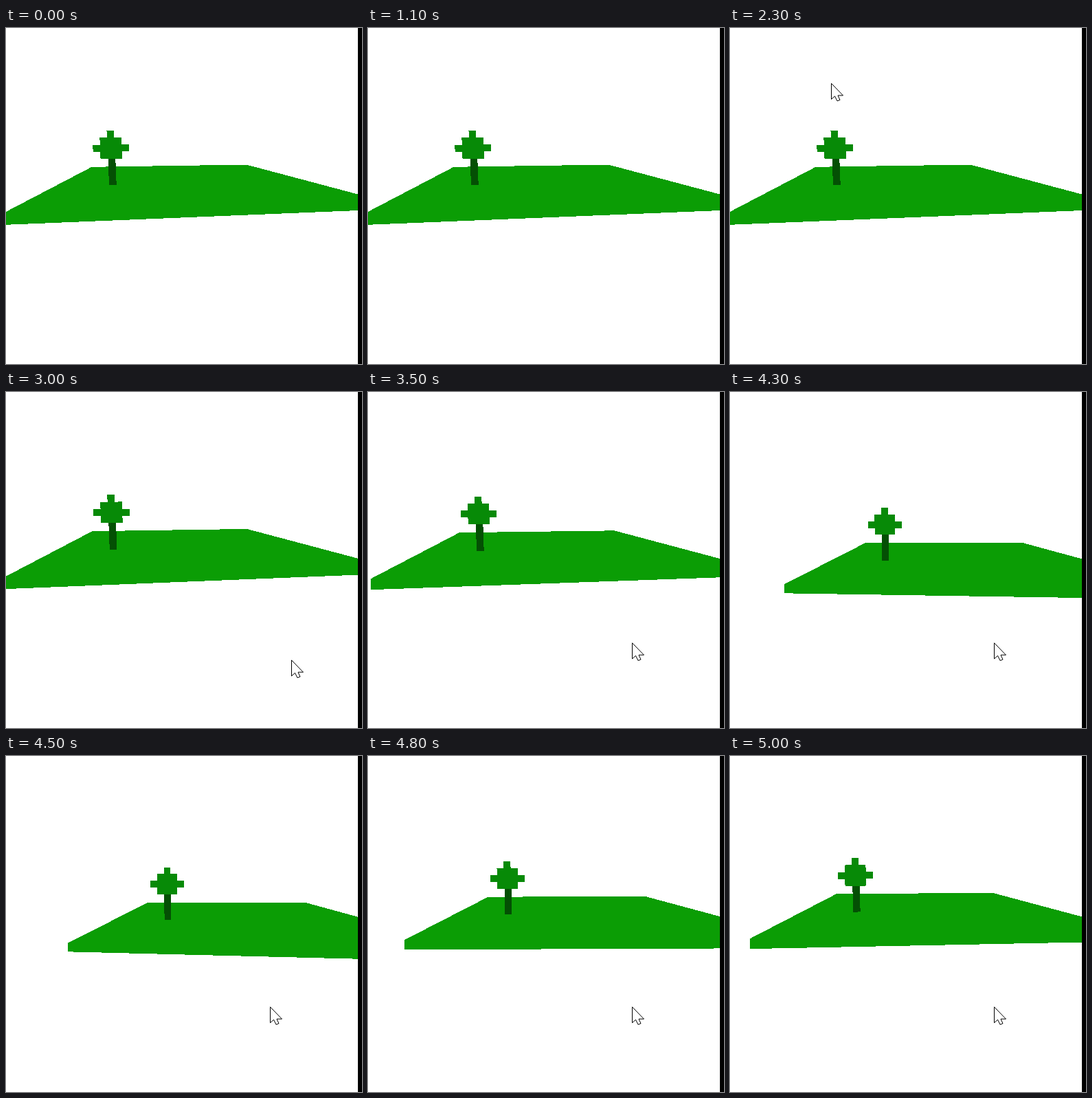
An HTML page with a canvas for the animation above (5.1 s loop, 518 px wide and 488 px high).

```html
<!DOCTYPE html>
<html lang="en">
<head>
<meta charset="utf-8">
<title>Tree on a field</title>
<style>
html, body { margin: 0; width: 100%; height: 100%; overflow: hidden; background: #fff; }
canvas { display: block; }
</style>
</head>
<body>
<canvas id="stage" width="518" height="488"></canvas>
<script>
const W = 518, H = 488, EDGE = 512, LOOP = 5100, STEP = 100;
const ctx = document.getElementById('stage').getContext('2d');

// camera path: time, pan (0 = far left, 1 = far right), height of the crown's centre
const camera = [
  [2900, 0, 174.5], [3500, 0.1, 177], [3750, 0.33, 169], [4000, 0.553, 178.5],
  [4250, 0.83, 192.5], [4500, 1, 186.2], [5000, 0.363, 173.5]
];
// pointer path: time, x, y of the tip
const pointer = [[2300, 147, 80], [2800, 451, 406], [3100, 384, 364]];
const arrow = [[0, 0], [0, 23], [5, 18.5], [8.5, 25.5], [12.5, 24], [9.5, 17.5], [17, 17.5]];

// smooth curve through the keys, held still before the first and after the last
function along(keys, t) {
  const at = i => keys[Math.max(0, Math.min(keys.length - 1, i))];
  let i = keys.findIndex(k => k[0] > t) - 1;
  if (i === -2) return at(keys.length).slice(1);
  if (i < 0) return at(0).slice(1);
  const [a, b, c, d] = [at(i - 1), at(i), at(i + 1), at(i + 2)];
  const p = (t - b[0]) / (c[0] - b[0]);
  return [1, 2].map(n => {
    const m = (c[n] - a[n]) / 2, q = (d[n] - b[n]) / 2, gap = c[n] - b[n];
    return b[n] + m * p + (3 * gap - 2 * m - q) * p * p + (m + q - 2 * gap) * p ** 3;
  });
}

// hard-edged polygon, filled row by row
function fill(points, color) {
  ctx.fillStyle = color;
  const ys = points.map(p => p[1]);
  for (let y = Math.floor(Math.min(...ys)); y <= Math.max(...ys); y++) {
    const mid = y + 0.5, hits = [];
    points.forEach(([x1, y1], i) => {
      const [x2, y2] = points[(i + 1) % points.length];
      if ((y1 <= mid) !== (y2 <= mid)) hits.push(x1 + (x2 - x1) * (mid - y1) / (y2 - y1));
    });
    hits.sort((a, b) => a - b);
    for (let i = 0; i + 1 < hits.length; i += 2) {
      const left = Math.round(hits[i]);
      ctx.fillRect(left, y, Math.round(hits[i + 1]) - left, 1);
    }
  }
}

function drawField(pan, cx, cy) {
  fill([
    [cx - 28, cy + 27.3 - pan],
    [cx + 197 + 6 * pan, cy + 24 + 3.2 * pan],
    [EDGE, cy + 67 - 19.5 * pan],
    [EDGE, cy + 90.5 + 18 * pan],
    [-5 + 95 * pan, cy + 111.5 - 13.4 * pan],
    [-6 + 96 * pan, cy + 95.5 - 10 * pan]
  ], '#0b9d05');
}

function drawTree(pan, cx, cy) {
  const w = 10.5 * (1 - 0.075 * pan), h = 10.2 * (1 - 0.038 * pan);
  const lean = 0.038 - 0.034 * pan;
  const place = (x, y) => [cx + x * w + y * h * lean, cy + y * h - x * w * lean * 0.25];
  const box = (l, t, r, b, color) =>
    fill([place(l, t), place(r, t), place(r, b), place(l, b)], color);
  box(-0.45, 1.4, 0.57, 5.27, '#045004');
  // stepped crown: top block, body, arms
  box(-0.5, -2.5, 0.5, 0, '#078a07');
  box(-1.5, -1.5, 1.5, 1.5, '#078a07');
  box(-2.5, -0.5, 2.5, 0.5, '#078a07');
}

function drawPointer(t) {
  if (t < pointer[0][0]) return;
  const [x, y] = along(pointer, t).map(Math.round);
  ctx.save();
  ctx.translate(x + 0.5, y + 0.5);
  ctx.beginPath();
  arrow.forEach(p => ctx.lineTo(...p));
  ctx.closePath();
  ctx.fillStyle = '#fff';
  ctx.fill();
  ctx.strokeStyle = '#000';
  ctx.stroke();
  ctx.restore();
}

function draw(now) {
  const t = Math.floor((now % LOOP) / STEP) * STEP;
  const [pan, cy] = along(camera, t);
  const cx = 152.7 + 82 * pan;
  ctx.fillStyle = '#fff';
  ctx.fillRect(0, 0, W, H);
  drawField(pan, cx, cy);
  drawTree(pan, cx, cy);
  drawPointer(t);
  ctx.fillStyle = '#000';
  ctx.fillRect(EDGE, 0, W - EDGE, H);
}

let start = null;
function tick(now) {
  if (start === null) start = now;
  draw(Math.max(0, now - start));
  requestAnimationFrame(tick);
}
draw(0);
requestAnimationFrame(tick);
</script>
</body>
</html>
```
